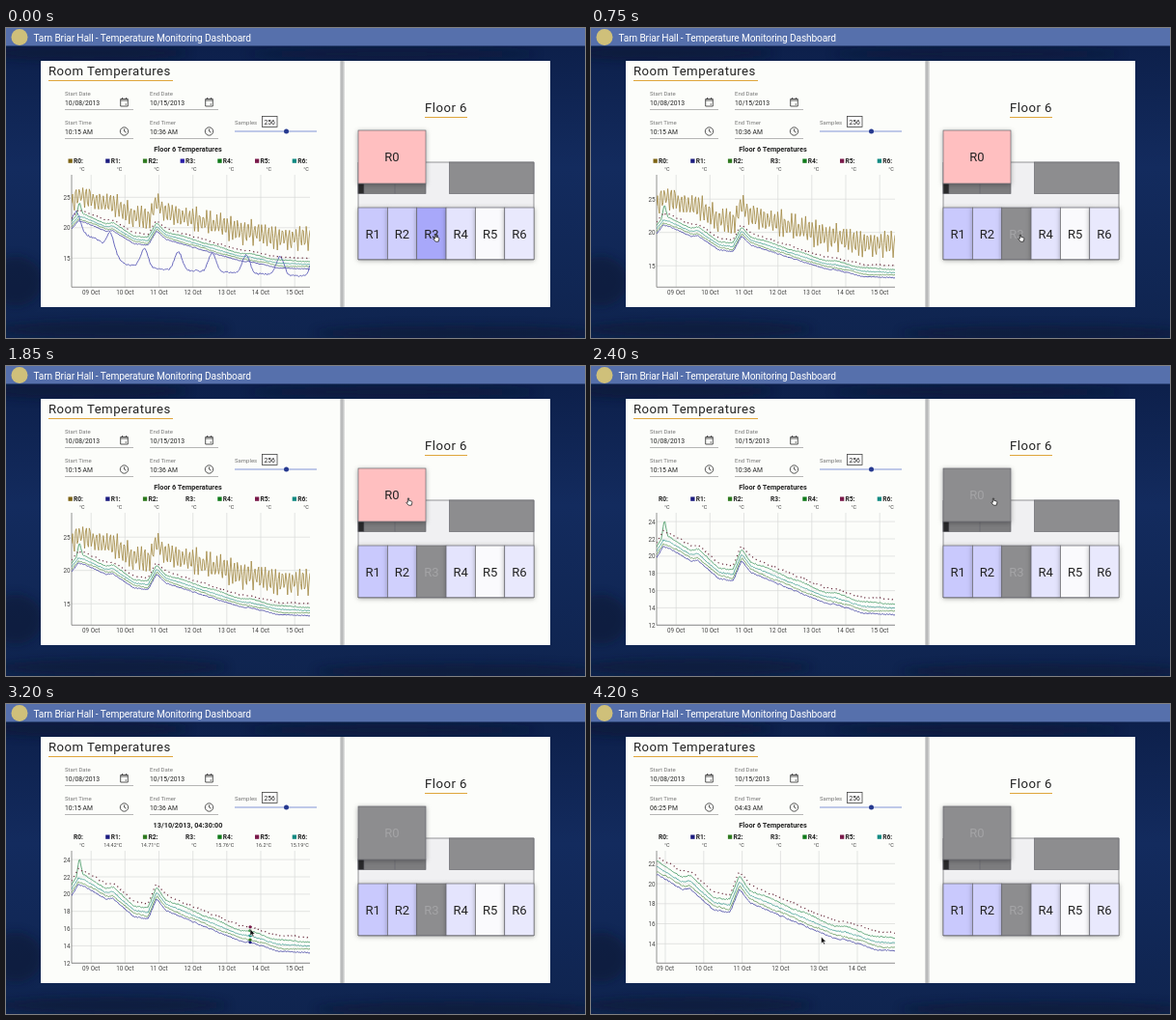
Animation, 600 px wide and 321 px high, one loop 4250 ms. Source, as an HTML page:

```html
<!DOCTYPE html>
<html lang="en">
<head>
<meta charset="utf-8">
<title>Temperature dashboard</title>
<style>
  html, body { margin: 0; width: 100%; height: 100%; overflow: hidden; background: #10244f; }
  svg { display: block; width: 100vw; height: 100vh; font-family: Roboto, "Open Sans", sans-serif; fill: #222; }
  .label { font-size: 6px; fill: #777; }
  .value { font-size: 6.8px; }
  .tick { font-size: 6.3px; fill: #444; }
  .legend { font-size: 6.7px; font-weight: 700; }
  .reading { font-size: 5.4px; text-anchor: end; fill: #444; }
  .heading { font-size: 13.2px; letter-spacing: .45px; }
  .room { font-size: 13px; text-anchor: middle; }
  .grid { stroke: #d8dad8; stroke-width: .7; }
  .plan { stroke: #68686e; stroke-width: .7; }
</style>
</head>
<body>
<svg viewBox="0 0 600 321" preserveAspectRatio="none">
  <defs>
    <clipPath id="plot"><rect x="68" y="150" width="247" height="118.5"/></clipPath>
    <linearGradient id="fold">
      <stop offset="0" stop-color="#dcdddc"/><stop offset=".4" stop-color="#b0b1b2"/>
      <stop offset="1" stop-color="#e2e3e2"/>
    </linearGradient>
    <linearGradient id="sky" x2="0" y2="1">
      <stop offset="0" stop-color="#0c1e48"/><stop offset=".45" stop-color="#132b5e"/>
      <stop offset="1" stop-color="#0f244f"/>
    </linearGradient>
    <filter id="soft" x="-30%" y="-60%" width="160%" height="220%"><feGaussianBlur stdDeviation="5"/></filter>
    <filter id="lift" x="-20%" y="-20%" width="140%" height="150%">
      <feDropShadow dx="0" dy="1" stdDeviation="2.5" flood-opacity=".32"/>
    </filter>
  </defs>

  <rect width="600" height="321" fill="url(#sky)"/>
  <g fill="#08142f" opacity=".5" filter="url(#soft)">
    <ellipse cx="80" cy="26" rx="110" ry="8"/>
    <ellipse cx="400" cy="27" rx="150" ry="6"/>
    <ellipse cx="10" cy="262" rx="28" ry="26"/>
    <ellipse cx="110" cy="312" rx="120" ry="9"/>
    <ellipse cx="470" cy="316" rx="150" ry="8"/>
  </g>
  <rect width="600" height="18.5" fill="#5670ac"/>
  <circle cx="14" cy="9.5" r="8.5" fill="#cfc07a"/>
  <text x="28.5" y="13.6" font-size="10.2" letter-spacing="-.15" fill="#fff">Tarn Briar Hall - Temperature Monitoring Dashboard</text>

  <rect x="36" y="34" width="528" height="255" fill="#fcfdfa"/>
  <rect x="346" y="34" width="5" height="255" fill="url(#fold)"/>

  <text class="heading" x="44" y="49.3">Room Temperatures</text>
  <text class="heading" x="456" y="87" text-anchor="middle">Floor 6</text>
  <path d="M44 54.5H173M434 92.5H478" stroke="#dfa63c" stroke-width="1.2"/>

  <g id="fields"></g>
  <text class="label" x="237" y="100">Samples</text>
  <rect x="265.5" y="91.5" width="15.5" height="11" fill="#fff" stroke="#444" stroke-width=".8"/>
  <text class="value" x="273.2" y="99.5" text-anchor="middle">256</text>
  <path d="M237 107H322" stroke="#8496d8" stroke-width="1.2"/>
  <circle cx="290.5" cy="107" r="2.5" fill="#26398f"/>

  <text id="title" x="188.5" y="127.5" font-size="7.3" font-weight="700" text-anchor="middle"></text>
  <g id="legend"></g>
  <g id="chart"></g>

  <g class="plan">
    <path d="M365 139H547V240H365Z" fill="#f0f0f2"/>
    <rect x="459.5" y="139" width="87.5" height="32.5" fill="#8d8d8f"/>
    <rect x="365" y="161" width="70" height="10.5" fill="#7c7c7e"/>
    <path d="M403 161V171.5"/>
    <rect x="365" y="161" width="6" height="10.5" fill="#29292b"/>
  </g>
  <g id="rooms"></g>

  <g id="cursor" stroke-linejoin="round">
    <path id="hand" transform="scale(.8)" fill="#fff" stroke="#111" stroke-width=".9"
      d="M-.8 0Q0-1 .8 0V3L4 3.8Q5 4.2 4.8 5.5L4 9H.2L-2.6 5.7Q-2.8 4.5-.8 5.3Z"/>
    <path id="arrow" fill="#111" stroke="#fff" stroke-width=".5"
      d="M0 0V7L1.7 5.5 2.8 8 4 7.5 2.9 5.1 5 5Z"/>
  </g>
</svg>

<script>
const LOOP = 4250, STEP = 50;
const HIDE_R3 = 500, HIDE_R0 = 2200, ZOOM_START = 3900;
const LEFT = 68, RIGHT = 315, TOP = 152, BOTTOM = 268.3, SAMPLES = 256;
const FULL = [0.427, 7.45], ZOOMED = [0.774, 6.98];   // days since 8 Oct

const $ = id => document.getElementById(id);
const lerp = (a, b, k) => a + (b - a) * k;
const clamp = k => Math.min(1, Math.max(0, k));
const ease = k => k * k * (3 - 2 * k);
const pad = n => String(n).padStart(2, '0');
const rand = n => { const s = Math.sin(n * 127.1) * 43758.5453; return s - Math.floor(s); };

function along(points, x) {
  const i = Math.max(1, points.findIndex(p => p[0] >= x));
  const [a, b] = [points[i - 1], points[i]];
  return lerp(a[1], b[1], clamp((x - a[0]) / (b[0] - a[0])));
}

// [day, °C]: slow cooling with a jump on 11 Oct
const COOLING = [[.427, 19.8], [.62, 21.1], [.8, 20.9], [1.45, 19.4], [1.65, 19.5], [2.25, 17.4], [2.68, 17.1],
  [2.93, 19.5], [3.2, 18.1], [4.3, 16.3], [5.4167, 14.52], [5.6875, 14.42], [6.5, 13.4], [7.46, 13.2]];
const AIRED = [[.427, 20], [1.2, 18], [2, 14], [3, 13.2], [7.46, 12]];

// A room follows the cooling curve, warmer by a gap, with its own daily swing.
const room = (gap, swing) => day => along(COOLING, day) + gap + swing * Math.sin(2 * Math.PI * day);
const spike = day => 1.9 * Math.max(0, 1 - Math.abs(day - .66) / .09);
const warm = room(1.275, -.07);

const SERIES = [
  { color: '#7d6414', line: '#a48c48', noise: 2.3, value: day => along(COOLING, day) + 4.2 + .12 * day },
  { color: '#1c1c80', line: '#4646a4', noise: .07, value: room(0, 0) },
  { color: '#2e7a1f', line: '#6a9c60', noise: .07, value: room(.348, .063) },
  { color: '#2a1ea8', line: '#5252b4', noise: .15,
    value: day => along(AIRED, day) + 3 * Math.cos(Math.PI * (day - .57)) ** 8 },
  { color: '#0f7a1a', line: '#4a9c68', noise: .07, value: day => warm(day) + spike(day) },
  { color: '#7a1a4a', line: '#6b3040', noise: .1, value: room(1.793, .014), dash: '1.2 3.6' },
  { color: '#0f8a82', line: '#4aa298', noise: .07, value: room(.7635, -.007) }
];

// Samples are fixed once so that zooming keeps their shape.
SERIES.forEach((s, n) => {
  s.points = Array.from({ length: SAMPLES + 1 }, (_, i) => {
    const day = lerp(...FULL, i / SAMPLES), r = rand(i + n * 300);
    const wave = n ? r * 2 - 1 : Math.sin(i * 1.7) * (.35 + .65 * r);
    return [day, s.value(day) + s.noise * wave];
  });
});

function clock(min) {
  const h = Math.floor(min / 60);
  return `${pad(h % 12 || 12)}:${pad(min % 60)} ${h < 12 ? 'AM' : 'PM'}`;
}

const CALENDAR = '<path d="M-3.8-3.5H3.8V4H-3.8ZM-2-5V-3M2-5V-3M1 2H2.5M-3.8-2H3.8"/>';
const DIAL = '<circle r="4.2"/><path d="M0-2.5V0L2 1.2"/>';
const field = (x, y, label, value, icon) => `
  <text class="label" x="${x}" y="${y}">${label}</text>
  <text class="value" x="${x}" y="${y + 9.6}">${value}</text>
  <path d="M${x} ${y + 14.5}h71" stroke="#999" stroke-width=".7"/>
  <g transform="translate(${x + 61.5} ${y + 7})" fill="none" stroke="#444" stroke-width=".9">${icon}</g>`;

function drawFields(zoom) {
  $('fields').innerHTML =
    field(61, 70, 'Start Date', '10/08/2013', CALENDAR) +
    field(149, 70, 'End Date', '10/15/2013', CALENDAR) +
    field(61, 100, 'Start Time', clock(Math.round(lerp(615, 1105, zoom))), DIAL) +
    field(149, 100, 'End Timer', clock(Math.round(lerp(636, 283, zoom))), DIAL);
}

function drawLegend(on, hover) {
  $('legend').innerHTML = SERIES.map((s, n) => {
    const x = 65 + n * 38.7;
    const reading = on[n] && hover !== null ? +s.value(hover).toFixed(2) : '';
    const swatch = on[n] ? `<rect x="${x - .5}" y="135.5" width="4.3" height="4.3" fill="${s.color}"/>` : '';
    return `${swatch}<text class="legend" x="${x + 5}" y="139.7">R${n}:</text>
      <text class="reading" x="${x + 16.5}" y="147.8">${reading}°C</text>`;
  }).join('');
  let title = 'Floor 6 Temperatures';
  if (hover !== null) {
    const halves = Math.round(hover * 48), hour = Math.floor(halves % 48 / 2) % 12 || 12;
    title = `${pad(8 + Math.floor(halves / 48))}/10/2013, ${pad(hour)}:${halves % 2 ? '30' : '00'}:00`;
  }
  $('title').textContent = title;
}

// Lowest value and pixels per degree of the vertical axis
function axis(on, zoom) {
  if (on[3]) return [10.24, 6.3];
  if (on[0]) return [11.8, 6.9];
  return [lerp(12, 12.07, zoom), lerp(8.93, 10.37, zoom)];
}

function drawChart(on, zoom, hover) {
  const [d0, d1] = FULL.map((d, i) => lerp(d, ZOOMED[i], zoom));
  const [floor, scale] = axis(on, zoom);
  const step = on[0] ? 5 : 2;
  const X = d => +lerp(LEFT, RIGHT, (d - d0) / (d1 - d0)).toFixed(1);
  const Y = v => +(BOTTOM - (v - floor) * scale).toFixed(1);
  let out = '';
  for (let d = Math.ceil(d0); d <= d1; d++) {
    out += `<path class="grid" d="M${X(d)} ${TOP}V${BOTTOM}"/>
      <text class="tick" x="${X(d)}" y="276.3" text-anchor="middle">${pad(8 + d)} Oct</text>`;
  }
  for (let v = Math.ceil(floor / step) * step; Y(v) > TOP + 3; v += step) {
    out += `<path class="grid" d="M${LEFT} ${Y(v)}H${RIGHT}"/>
      <text class="tick" x="66.5" y="${Y(v) + 2.5}" text-anchor="end">${v}</text>`;
  }
  out += `<path d="M${LEFT} ${TOP}V${BOTTOM}H${RIGHT}" fill="none" stroke="#777" stroke-width=".8"/>`;
  SERIES.filter((_, n) => on[n]).forEach(s => {
    const line = s.points.map(([d, v]) => `${X(d)} ${Y(v)}`).join('L');
    out += `<path d="M${line}" clip-path="url(#plot)" fill="none" stroke="${s.line}"
      stroke-width="${s.dash ? 1.2 : .85}" stroke-dasharray="${s.dash || 'none'}"/>`;
    if (hover !== null) out += `<circle cx="${X(hover)}" cy="${Y(s.value(hover))}" r="1.6" fill="${s.color}"/>`;
  });
  $('chart').innerHTML = out;
}

const ROOM_FILLS = ['#ffbfc0', '#c9c9fd', '#d0d0fd', '#a8a8fa', '#e4e4fd', '#fafafd', '#e9e9fd'];
function drawRooms(on) {
  $('rooms').innerHTML = ROOM_FILLS.map((fill, n) => {
    const [x, y, w, h] = n ? [365 + (n - 1) * 30.35, 186, 30.35, 53.7] : [365, 106, 70, 55];
    return `<rect class="plan" filter="url(#lift)" x="${x}" y="${y}" width="${w}" height="${h}" fill="${on[n] ? fill : '#8d8d8f'}"/>
      <text class="room" x="${x + w / 2}" y="${y + h / 2 + 4.8}" fill="${on[n] ? '#222' : '#a4a4a6'}">R${n}</text>`;
  }).join('');
}

// [start, end, x, y]: each move leads on from the last place
const MOVES = [[1050, 1700, 417, 137], [2500, 3150, 253, 233], [3250, 3750, 243.5, 241], [3850, 4000, 238.5, 241]];
const cursorAt = t => MOVES.reduce(([x, y], [start, end, toX, toY]) => {
  const k = ease(clamp((t - start) / (end - start)));
  return [lerp(x, toX, k), lerp(y, toY, k)];
}, [445, 214]);

let drawn = '';
function render(t) {
  const [x, y] = cursorAt(t);
  const on = SERIES.map((_, n) => !(n === 3 && t >= HIDE_R3 || n === 0 && t >= HIDE_R0));
  const zoom = clamp(Math.floor((t - ZOOM_START) / 100) / 3);
  const overChart = !zoom && x > LEFT && x < RIGHT && y > TOP && y < BOTTOM;
  const day = lerp(...FULL, (x - LEFT) / (RIGHT - LEFT));
  const hover = overChart ? Math.round(day * 48) / 48 : null;
  const overRoom = x > 365 && (y < 161 || y > 186);

  $('cursor').setAttribute('transform', `translate(${x} ${y})`);
  $('hand').style.display = overRoom ? '' : 'none';
  $('arrow').style.display = overRoom ? 'none' : '';

  const state = [on, zoom, hover].join();
  if (state === drawn) return;
  drawn = state;
  drawFields(zoom);
  drawLegend(on, hover);
  drawChart(on, zoom, hover);
  drawRooms(on);
}

const start = performance.now();
function frame() {
  const t = (performance.now() - start) % LOOP;
  render(Math.floor(t / STEP) * STEP);
  requestAnimationFrame(frame);
}
frame();
</script>
</body>
</html>
```
